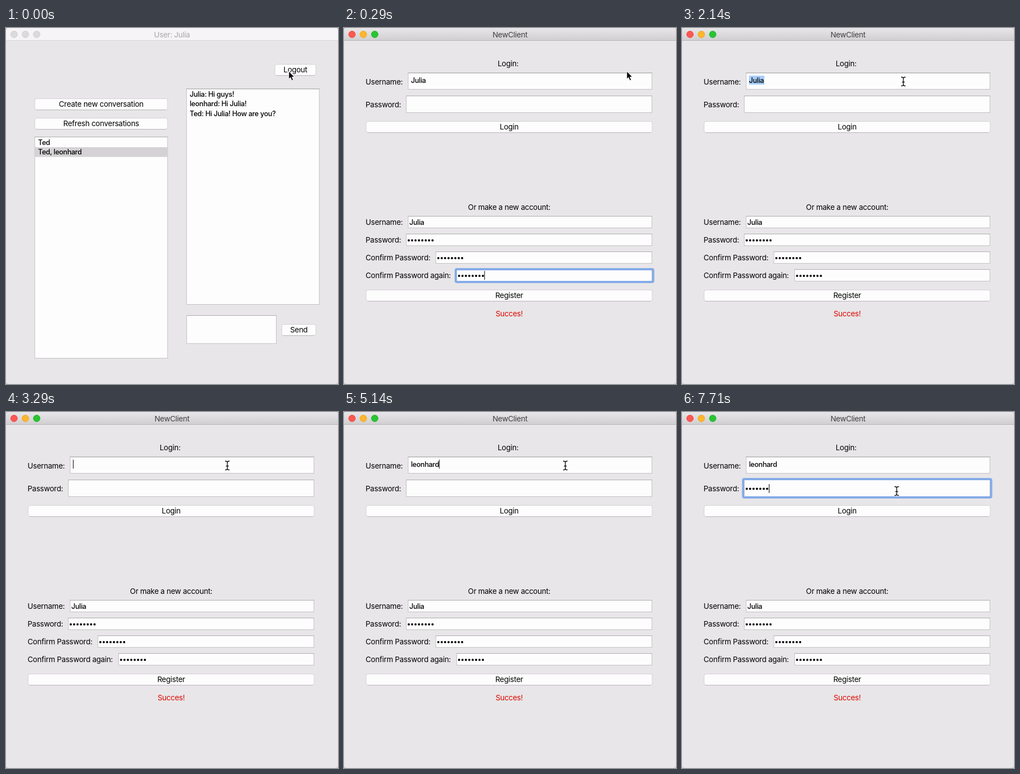
Animation of 600x642 px, one loop 8000 ms. Source, as an HTML page:

```html
<!DOCTYPE html>
<html lang="en">
<head>
<meta charset="utf-8">
<title>Chat client</title>
<style>
  html, body { margin: 0; width: 100%; height: 100%; overflow: hidden; background: #cdd0d2; }
  svg { display: block; width: 600px; height: 642px; }
  text { font: 13.5px Inter, "Open Sans", sans-serif; letter-spacing: -0.26px; fill: #000; white-space: pre; }
  .small { font-size: 12.7px; font-weight: 500; letter-spacing: -0.33px; }
  .mid { text-anchor: middle; }
  .error { fill: #dc0500; }
  .box { fill: #fefdfe; stroke: #c3c1c3; }
  .button { fill: #fefdfe; stroke: #d3d1d3; }
  .ring { fill: none; stroke: #84abe8; stroke-width: 4; }
  #title { fill: #403e40; }
  .inactive #title { fill: #a9a7a9; }
  .inactive #bar { fill: #f6f4f6; }
  .inactive #barLine { fill: #d6d4d6; }
  .inactive #lights circle { fill: #dcdadc; stroke: #cfcdcf; }
</style>
</head>
<body>
<svg id="stage" viewBox="0 0 600 642">
  <defs>
    <linearGradient id="metal" x2="0" y2="1">
      <stop stop-color="#e8e6e8"/><stop offset="1" stop-color="#d1cfd1"/>
    </linearGradient>
    <path id="beamShape" d="M-4 -8Q0 -8 0 -5.5Q0 -8 4 -8M0 -6V6M-4 8Q0 8 0 5.5Q0 8 4 8M-2.5 1H2.5"/>
  </defs>
  <rect width="600" height="642" rx="5" fill="#e8e6e8"/>
  <path id="bar" d="M0 22V5Q0 0 5 0H595Q600 0 600 5V22Z" fill="url(#metal)"/>
  <rect id="barLine" y="22" width="600" height="1" fill="#b6b4b6"/>
  <g id="lights">
    <circle cx="14.5" cy="11.5" r="6" fill="#fc5753" stroke="#ec4c47"/>
    <circle cx="35" cy="11.5" r="6" fill="#fdb62c" stroke="#eaa827"/>
    <circle cx="55.5" cy="11.5" r="6" fill="#29c433" stroke="#23b42d"/>
  </g>
  <text id="title" class="mid" x="300" y="17"></text>
  <g id="chat"></g>
  <g id="login"></g>
  <path id="arrow" d="M0 0V14.2L3.2 11.3 5.6 16.8 8.2 15.7 5.8 10.3H10.2Z" stroke="#fff"/>
  <g id="beam" fill="none">
    <use href="#beamShape" stroke="#fff" stroke-width="3"/>
    <use href="#beamShape" stroke="#111" stroke-width="1.4"/>
  </g>
</svg>
<script>
const LOOP = 8000, FRAME = 1000 / 7;
const USER = "Julia", FRIEND = "Ted", OTHER = "leonhard";
const byId = id => document.getElementById(id);
const show = (el, on) => { el.style.display = on ? "" : "none"; };

function add(parent, tag, attrs, content = "") {
  const el = document.createElementNS("http://www.w3.org/2000/svg", tag);
  for (const key in attrs) el.setAttribute(key, attrs[key]);
  el.textContent = content;
  return parent.appendChild(el);
}
const text = (g, x, y, s, cls = "") => add(g, "text", { x, y, class: cls }, s);

// Edges are given as left, top, right, bottom
function rect(g, l, t, r, b, cls, rx = 0) {
  return add(g, "rect", { x: l, y: t, width: r - l, height: b - t, rx, class: cls });
}
function box(g, l, t, r, b) {
  rect(g, l + .5, t + .5, r - .5, b - .5, "box");
  add(g, "path", { d: `M${l} ${t + .5}H${r}`, stroke: "#aeacae" });
}
function button(g, l, t, r, label) {
  rect(g, l + .5, t + .5, r - .5, t + 20.5, "button", 3.5);
  add(g, "path", { d: `M${l + 3} ${t + 20.7}H${r - 3}`, stroke: "#bbb9bb" });
  text(g, (l + r) / 2, t + 15, label, "mid");
}
function dots(g, x, y, count) {
  return Array.from({ length: count }, (_, i) =>
    add(g, "circle", { cx: x + i * 6.14, cy: y, r: 2 }));
}
const caret = (g, x, y) => add(g, "rect", { x, y, width: 1, height: 16 });

const chat = byId("chat"), login = byId("login");

// Conversation window
button(chat, 485.5, 65, 560.5, "Logout");
button(chat, 51.5, 127, 292.5, "Create new conversation");
button(chat, 51.5, 162, 292.5, "Refresh conversations");
box(chat, 51.5, 196, 292.5, 596);
add(chat, "rect", { x: 52, y: 215, width: 240, height: 17.5, fill: "#d4d2d4" });
[FRIEND, `${FRIEND}, ${OTHER}`].forEach((s, i) => text(chat, 58, 210.5 + i * 17.5, s, "small"));
box(chat, 325.7, 109.3, 566.7, 499);
[`${USER}: Hi guys!`, `${OTHER}: Hi ${USER}!`, `${FRIEND}: Hi ${USER}! How are you?`]
  .forEach((s, i) => text(chat, 332, 123.5 + i * 17.6, s, "small"));
box(chat, 326, 518, 489, 569.5);
button(chat, 498, 534, 560.5, "Send");

// Login window
text(login, 296.5, 69, "Login:", "mid");
text(login, 39, 101.5, "Username:");
box(login, 115.5, 80.5, 557, 111);
const marked = add(login, "rect", { x: 121, y: 86, height: 16, fill: "#a8cdfb" });
const nameText = text(login, 121, 99, USER, "small");
const nameCaret = caret(login, 121, 86);
text(login, 39, 143, "Password:");
box(login, 112, 122, 557, 153);
const passRing = rect(login, 110.5, 121, 558.7, 154, "ring", 2);
const passDots = dots(login, 117, 138.5, 7);
const passCaret = caret(login, 114, 130);
button(login, 39.5, 168, 557.5, "Login");

text(login, 298.5, 328, "Or make a new account:", "mid");
[["Username:", 115.5], ["Password:", 112], ["Confirm Password:", 165.5], ["Confirm Password again:", 203]]
  .forEach(([label, left], i) => {
    const y = 339 + i * 32;
    text(login, 39, y + 16, label);
    box(login, left, y, 557, y + 22);
    if (i) dots(login, left + 5, y + 12, 8);
    else text(login, 118, y + 16, USER, "small");
  });
const againRing = rect(login, 202, 435, 558.7, 458, "ring", 2);
const againCaret = caret(login, 253.5, 438);
button(login, 39.5, 472, 557.5, "Register");
text(login, 298.5, 520, "Succes!", "mid error");

// Times at which each character arrives
const nameKeys = [4000, 4140, 4290, 4430, 4570, 4710, 4860, 5140];
const passKeys = [6140, 6290, 6570, 6710, 7140, 7570, 7710];
const typed = (keys, t) => keys.filter(k => t >= k).length;

function glide(t, start, end) {
  const p = Math.min(1, Math.max(0, (t - start) / (end - start)));
  return p * p * (3 - 2 * p);
}

function render(now) {
  const step = Math.floor((now % LOOP + 5) / FRAME);
  const t = Math.round(step * FRAME / 10) * 10;
  const inChat = t < 290;
  byId("stage").classList.toggle("inactive", t < 140);
  byId("title").textContent = inChat ? `User: ${USER}` : "NewClient";
  show(chat, inChat);
  show(login, !inChat);

  const a = glide(t, 430, 1430), b = glide(t, 5430, 5860);
  const x = 511 - 111 * a - 12 * b, y = 78 + 18.5 * a + 46 * b;
  const overField = !inChat && y > 81 && (y < 111 || y > 122);
  show(byId("arrow"), !overField);
  show(byId("beam"), overField);
  byId(overField ? "beam" : "arrow").setAttribute("transform", `translate(${x} ${y})`);
  if (inChat) return;

  const focus = t < 1570 ? "again" : t < 5860 ? "name" : "pass";
  const selected = t >= 1710 && t < 3000;
  nameText.textContent = t < 3000 ? USER : OTHER.slice(0, typed(nameKeys, t));
  const width = nameText.textContent ? nameText.getComputedTextLength() : 0;
  marked.setAttribute("width", width + 1);
  show(marked, selected);
  nameCaret.setAttribute("x", 121 + width);
  show(nameCaret, focus === "name" && !selected);

  const count = typed(passKeys, t);
  passDots.forEach((dot, i) => show(dot, i < count));
  passCaret.setAttribute("x", 114 + count * 6.14);
  show(passRing, focus === "pass");
  show(passCaret, focus === "pass");
  show(againRing, focus === "again");
  show(againCaret, focus === "again");
}

const begin = performance.now();
function tick() {
  render(performance.now() - begin);
  requestAnimationFrame(tick);
}
tick();
</script>
</body>
</html>
```
